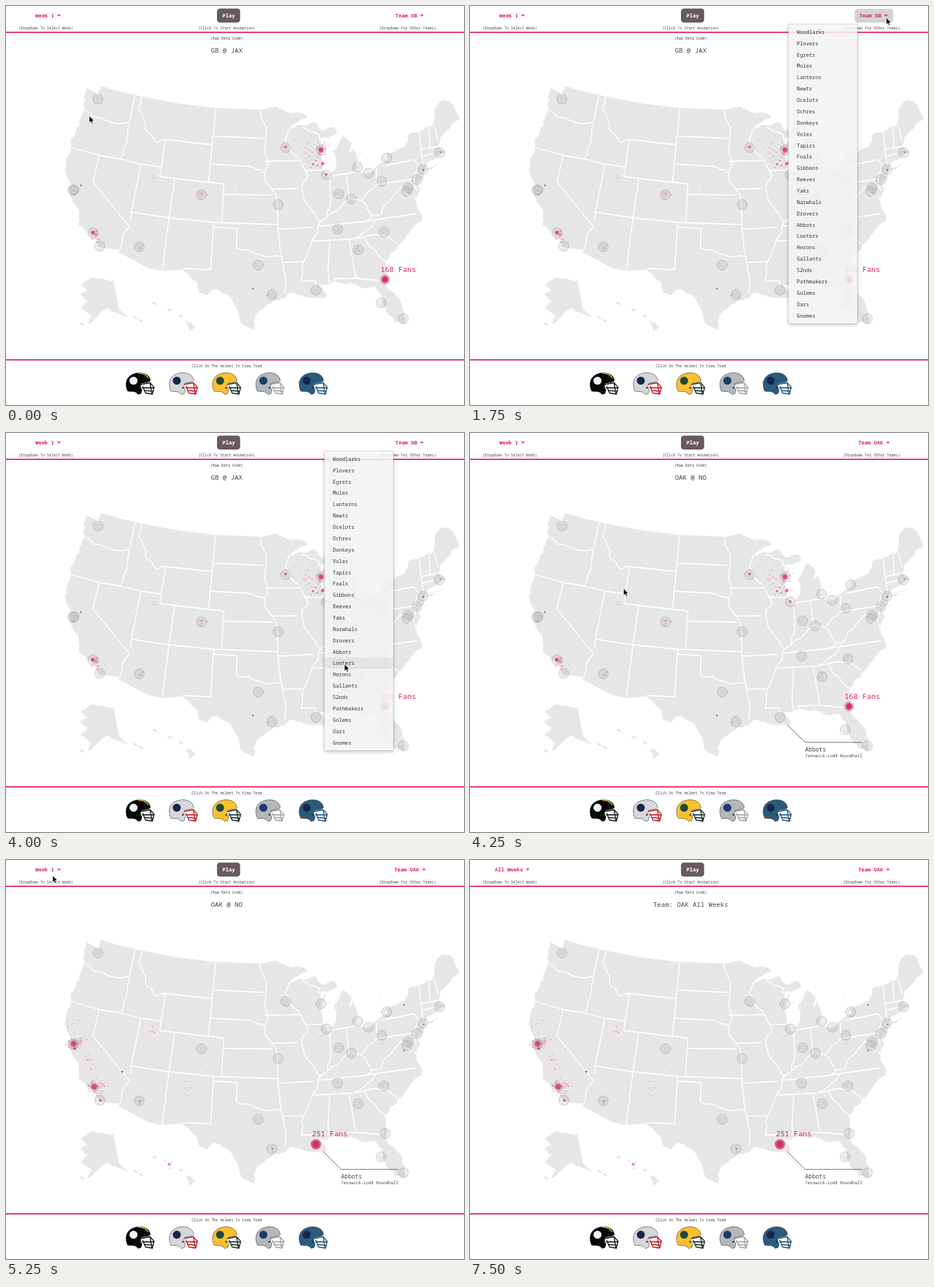
An HTML page for the animation above (8000 ms loop, 801 by 699 pixels).

```html
<!DOCTYPE html>
<html lang="en">
<head>
<meta charset="utf-8">
<title>Fan map</title>
<style>
html, body { margin: 0; width: 100%; height: 100%; overflow: hidden; background: #fff; }
svg { display: block; width: 100%; height: 100%; }
text { font-family: "Noto Sans Mono", "DejaVu Sans Mono", monospace; white-space: pre; }
.land { fill: #e6e6e6; stroke: #e6e6e6; stroke-width: .8; stroke-linejoin: round; }
.border { fill: none; stroke: #fff; stroke-width: 1.8; stroke-linejoin: round; }
.city { fill: rgba(140,140,140,.17); stroke: rgba(90,90,90,.38); stroke-width: .8; }
.menu { filter: drop-shadow(0 2px 3px rgba(0,0,0,.3)); }
</style>
</head>
<body>
<svg id="stage" viewBox="0 0 801 699"></svg>
<script>
const PINK = '#df2463', DARK = '#444', LOOP = 8000, STEP = 250;
const stage = document.getElementById('stage');

function el(tag, attrs = {}, parent = stage) {
  const node = document.createElementNS('http://www.w3.org/2000/svg', tag);
  for (const key in attrs) node.setAttribute(key, attrs[key]);
  parent.append(node);
  return node;
}
// adv is the width of one character
function label(str, x, y, adv, opts = {}, parent = stage) {
  const node = el('text', { x, y, 'font-size': adv / .6, fill: DARK, ...opts }, parent);
  node.textContent = str;
  return node;
}
const mid = { 'text-anchor': 'middle' };
const rect = (x, y, width, height, rx, fill, parent) =>
  el('rect', { x, y, width, height, rx, fill }, parent);
const show = (node, on) => node.setAttribute('opacity', Number(on));

function random(seed) {
  return () => (seed = seed * 16807 % 2147483647) / 2147483647;
}

// ---- map ----
const rough = random(77);
const parse = str => str.split(' ').map(p => p.split(',').map(Number));
// splits every edge and shifts its middle sideways, a few times over
function wiggle(pts, depth = 3, amount = .2) {
  if (!depth) return pts;
  const out = [pts[0]];
  for (let i = 1; i < pts.length; i++) {
    const [x0, y0] = pts[i - 1], [x1, y1] = pts[i], k = (rough() - .5) * amount;
    out.push([(x0 + x1) / 2 + (y1 - y0) * k, (y0 + y1) / 2 - (x1 - x0) * k], pts[i]);
  }
  return wiggle(out, depth - 1, amount * 1.4);
}
function land(coast, inner) {
  const pts = wiggle(parse(coast)).concat(inner ? parse(inner) : []);
  el('polygon', { class: 'land', points: pts.join(' ') });
}
const line = pts => el('polyline', { class: 'border', points: pts.join(' ') });
const border = (...rows) => rows.forEach(row => line(parse(row)));
const river = (...rows) => rows.forEach(row => line(wiggle(parse(row), 2, .22)));

// west coast, Gulf, south-east, north-east, lakes, Alaska, Hawaii
land('166,140 163,161 157,153 140,145 138,167 137,182 114,233 113,256 105,273 113,326 127,382 143,397 165,423',
  '199,427 197,431 247,458 272,464 309,461 450,460 450,182 367,179 300,171 237,159 190,148');
land('309,461 338,501 352,506 362,495 384,504 412,556 435,567 437,541 468,516 500,502 533,511 560,510 546,489 588,485 612,488',
  '612,400 309,380');
land('612,488 628,494 645,491 658,506 659,523 680,553 697,557 697,538 664,483 663,453 684,421 701,402 727,377 718,346 709,320 718,337 725,322 719,310',
  '690,300 612,340');
land('611,291 630,296 669,268 668,258 698,245 706,224 745,212 755,173 764,165 776,167 793,198 760,229 756,246 769,257 735,276 730,301 719,312',
  '690,330 612,342');
land('467,177 493,187 527,194 497,215 540,204 552,219 575,213 578,223 550,232 549,247 558,235 553,285 567,300 578,280 573,254 590,228 604,240 599,259 609,251 615,270 610,290',
  '612,400 450,460 450,182');
land('733,287 758,276');
land('188,481 150,476 132,488 143,499 130,505 143,516 131,530 150,543 143,557 176,530 212,545', '197,531');
land('316,552 332,562 321,571 316,552');
[[306, 543], [286, 533], [260, 521], [226, 546], [236, 551], [133, 557]].forEach(([cx, cy]) =>
  el('ellipse', { class: 'land', cx, cy, rx: 4, ry: 1.6, transform: `rotate(25 ${cx} ${cy})` }));

border('226,156 216,203', '112,247 163,262 201,268 236,277 272,282', '279,234 269,299 381,312 377,380',
  '279,234 361,243', '367,179 354,309', '364,228 450,232', '163,262 152,308 216,387', '236,277 219,361 218,375',
  '219,361 285,371 363,379 475,383', '295,303 285,371 273,465', '363,379 358,462 309,460');
border('363,387 404,390 403,424', '453,272 514,271', '358,277 426,281', '380,330 466,331', '463,321 510,320',
  '475,343 475,383 480,431 484,449 520,448', '477,391 537,388', '523,288 556,288', '566,298 568,340',
  '567,298 611,291', '595,294 600,335');
border('536,412 609,408 645,400 668,404 685,417', '545,386 622,378 718,364', '566,412 563,465 566,487',
  '600,410 612,477 573,478 577,487', '612,477 652,481 662,477', '648,285 648,313 713,303 718,324', '657,281 714,269',
  '722,219 727,262 730,280', '740,212 741,249', '748,206 756,236', '727,251 757,246', '728,263 750,258');
river('137,181 151,194 215,204 211,231 201,268', '237,158 232,181 244,215 262,238 279,234', '216,387 199,427',
  '444,181 453,246 452,291 475,343', '426,281 452,291', '403,424 446,436 483,440', '484,449 488,503',
  '497,214 489,235 512,265 528,298 517,319 536,360 550,378 535,412 520,450 516,482');
border('516,482 540,481 543,492');
river('516,213 548,225 549,234', '550,378 588,350 600,335 622,341 648,313', '568,340 562,367', '609,408 646,376',
  '628,406 665,448', '623,379 640,368 623,342', '640,368 656,365 691,317 708,335', '714,269 722,279 713,303');

const cities = parse('161,163 117,323 119,322 152,398 164,421 233,422 342,331 489,248 551,252 560,296 476,348 ' +
  '441,454 465,506 542,498 580,391 616,427 663,479 656,520 695,548 661,396 582,329 604,338 615,282 634,293 ' +
  '657,307 666,266 758,257 729,286 719,304 703,319 701,325');
cities.forEach(([cx, cy]) => el('circle', { class: 'city', cx, cy, r: 8.8 }));

// ---- fans ----
// spots: x y radius; clouds: x y spread count; the rest is strewn over towns and land
function fans(seed, spots, clouds) {
  const group = el('g', { fill: PINK }), rnd = random(seed);
  const dot = (cx, cy, r, opacity) => el('circle', { cx, cy, r, opacity }, group);
  const bell = spread => (rnd() + rnd() + rnd() - 1.5) * 1.6 * spread;
  for (const [x, y, r] of spots) {
    dot(x, y, r, .5);
    dot(x, y, r * .65, .6);
  }
  for (const [x, y, spread, n] of clouds)
    for (let i = 0; i < n; i++) dot(x + bell(spread), y + bell(spread), .45 + rnd() * .5, .6);
  for (const [x, y] of cities)
    for (let i = rnd() * 4; i > 0; i--) dot(x + bell(4), y + bell(4), .5, .5);
  for (let i = 0; i < 34; i++) dot(150 + rnd() * 520, 200 + rnd() * 220, .6, .6);
  return group;
}
const north = fans(11,
  [[551,252,5.2],[554,276,3],[537,277,2],[489,247,2.2],[432,495,1.8],[131,314,1.8],[152,397,3.6],[560,295,2.2],[730,287,2],[760,256,1.5]],
  [[536,253,19,42],[548,268,9,26],[157,403,8,32],[236,423,4,8],[342,331,6,9],[465,502,5,8],[615,426,4,7],[672,507,4,4],[702,323,6,8],[258,298,6,6]]);
const west = fans(29,
  [[118,322,5.6],[120,330,2.5],[154,397,6],[165,421,2.3],[203,371,2],[285,533,2],[466,506,1.7],[696,254,1.7],[696,334,1.5],[731,288,1.5]],
  [[118,322,8,30],[129,319,8,36],[159,399,9,60],[145,348,6,12],[154,368,6,7],[113,285,8,7],[285,533,5,7],[235,423,4,8],[314,401,7,5],[258,298,6,5]]);

function goal(x, y, r, str, tx, ty) {
  const group = el('g');
  el('circle', { cx: x, cy: y, r, fill: PINK, opacity: .55 }, group);
  el('circle', { cx: x, cy: y, r: r * .78, fill: PINK, opacity: .65 }, group);
  el('circle', { cx: x, cy: y, r: r * .5, fill: '#c01c56', opacity: .5 }, group);
  label(str, tx, ty, 7.8, { fill: PINK, 'font-weight': 500 }, group);
  return group;
}
const goalA = goal(663, 479, 7, '168 Fans', 655, 465.5);
const goalB = goal(542, 498, 9, '251 Fans', 535, 483.5);

const callout = el('g');
el('path', { d: 'M555,511L586,542H686', fill: 'none', stroke: '#555' }, callout);
label('Abbots', 586, 557.5, 6.1, {}, callout);
label('Tarnwick-Lodd Roundhall', 586, 567.8, 4.36, {}, callout);

// ---- header and footer ----
rect(0, 45, 801, 2.2, 0, PINK);
rect(0, 618.8, 801, 2.2, 0, PINK);
const weekHover = rect(43, 5, 62, 24, 5, '#d2d2d2');
const teamHover = rect(673, 5, 67, 24, 5, '#d2d2d2');
rect(369, 4.5, 40.5, 24.5, 5, '#675a5c');
label('Play', 389.5, 20.3, 5.5, { ...mid, fill: '#fff', 'font-weight': 700 });
label('(Dropdown To Select Week)', 69.7, 41.3, 3.82, mid);
label('(Click To Start Animation)', 386, 41.3, 3.82, mid);
label('(Dropdown For Other Teams)', 702.4, 41.3, 3.82, mid);
label('(Raw Data Code)', 386, 59.2, 3.82, mid);
label('Click On The Helmet To View Team', 386, 632.5, 3.84, mid);
const title = label('', 386, 81.5, 6.9, mid);

function picker() {
  const text = label('', 0, 20, 5.46, { fill: PINK, 'font-weight': 600 });
  const arrow = el('path', { d: 'M0,15.2h6.4l-3.2,3.4z', fill: PINK });
  return (str, x) => {
    text.textContent = str;
    text.setAttribute('x', x);
    arrow.setAttribute('transform', `translate(${x + str.length * 5.46 + 5},0)`);
  };
}
const setWeek = picker(), setTeam = picker();

function helmet(i, shell, mark, mask) {
  const g = el('g', { transform: `translate(${209 + i * 75.7},642)`, 'stroke-linejoin': 'round' });
  el('path', { d: 'M27,21L43,18L50,26L47,38L35,36L30,24M29,27H49M32,31.5L48,33M43,18L46,38',
    fill: 'none', stroke: mask, 'stroke-width': 1.8 }, g);
  el('path', { d: 'M1,22C0,8 12,.6 25,.6C36,.6 43,7 43.5,14L41,16.5L28,19C25,23 27,28 29,31L27,37L22,38.5C20,36 18,34 14,33.5L4,33C1.5,29 1,25 1,22Z',
    fill: shell, stroke: '#333', 'stroke-width': .7 }, g);
  el('circle', { cx: 24.5, cy: 27, r: 1.4, fill: '#222' }, g);
  el('circle', { cx: 14, cy: 14.5, r: 7, fill: mark }, g);
  return g;
}
const first = helmet(0, '#080808', '#f4f4f4', '#222');
el('path', { d: 'M22,1.2C32,1 37,5 40,10', fill: 'none', stroke: '#e9b52c', 'stroke-width': 1.8 }, first);
helmet(1, '#d5d7d9', '#15284f', '#c3232f');
helmet(2, '#fbc02d', '#1e4a36', '#20372a');
helmet(3, '#b4b8bc', '#1d3a68', '#a3a7aa');
helmet(4, '#2c5b80', '#14294a', '#2c5b80');

// ---- menus ----
const ROW = 19.87;
const teams = ('Woodlarks Plovers Egrets Moles Lanterns Newts Ocelots Ochres Donkeys Voles Tapirs Foals Gibbons Reeves ' +
  'Yaks Narwhals Drovers Abbots Looters Herons Gallants 52nds Pathmakers Golems Oars Gnomes').split(' ');
function menu(x, y, w, h) {
  const group = el('g');
  rect(x, y, w, h, 2, 'rgba(255,255,255,.83)', group).setAttribute('class', 'menu');
  el('rect', { x, y, width: w, height: h, rx: 2, fill: 'none', stroke: 'rgba(0,0,0,.2)', 'stroke-width': .8 }, group);
  return { group, bar: rect(x, 0, w, ROW, 0, 'rgba(0,0,0,.055)', group) };
}
const teamMenu = menu(557, 32, 120.5, 524.5);
teams.forEach((name, i) => label(name, 571.5, 48.8 + i * ROW, 5.4, { fill: '#333' }, teamMenu.group));
const weekMenu = menu(-75.5, 32, 120, 426);
weekMenu.bar.setAttribute('y', 393);

// ---- pointer: step, x, y ----
const path = [[0,145.5,192.5],[5,728,20.5],[7,728,20.5],[12,617,455],[16,592,405],[17,268.5,272.5],[21,81.5,27],[23,70,24],[26,-20,400]];
const pointer = el('path', { d: 'M0,0V12L2.8,9.5L4.6,13.6L6.7,12.7L4.9,8.7H8.6Z', stroke: '#fff', 'stroke-width': .8 });
function pointerAt(step) {
  const i = path.findIndex(p => p[0] > step);
  if (i < 0) return path[path.length - 1].slice(1);
  const [s0, x0, y0] = path[i - 1], [s1, x1, y1] = path[i];
  const u = (step - s0) / (s1 - s0), e = u * u * (3 - 2 * u);
  return [x0 + (x1 - x0) * e, y0 + (y1 - y0) * e];
}

function render(step) {
  const [x, y] = pointerAt(step);
  pointer.setAttribute('transform', `translate(${x},${y})`);

  const picked = step >= 17, all = step >= 29;
  setTeam(picked ? 'Team OAK' : 'Team GB', picked ? 679 : 681);
  setWeek(all ? 'All Weeks' : 'Week 1', all ? 43.5 : 51.5);
  title.textContent = all ? 'Team: OAK All Weeks' : picked ? 'OAK @ NO' : 'GB @ JAX';
  show(callout, picked);

  const mix = Math.min(1, Math.max(0, (step - 17) / 3));
  show(north, 1 - mix);
  show(west, mix);
  show(goalA, step < 19);
  show(goalB, step >= 19);

  show(teamHover, step >= 5 && step < 15);
  show(weekHover, step >= 22 && step < 30);
  show(teamMenu.group, step >= 7 && step < 17);
  show(weekMenu.group, step >= 23 && step < 29 ? 1 : step === 29 ? .4 : 0);

  const row = Math.floor((y - 44) / ROW);
  show(teamMenu.bar, row >= 0 && x < 677);
  teamMenu.bar.setAttribute('y', 35.6 + row * ROW);
  show(weekMenu.bar, step >= 26);
}

const start = performance.now();
let last = -1;
function tick() {
  const step = Math.floor((performance.now() - start) % LOOP / STEP);
  if (step !== last) render(last = step);
  requestAnimationFrame(tick);
}
tick();
</script>
</body>
</html>
```
